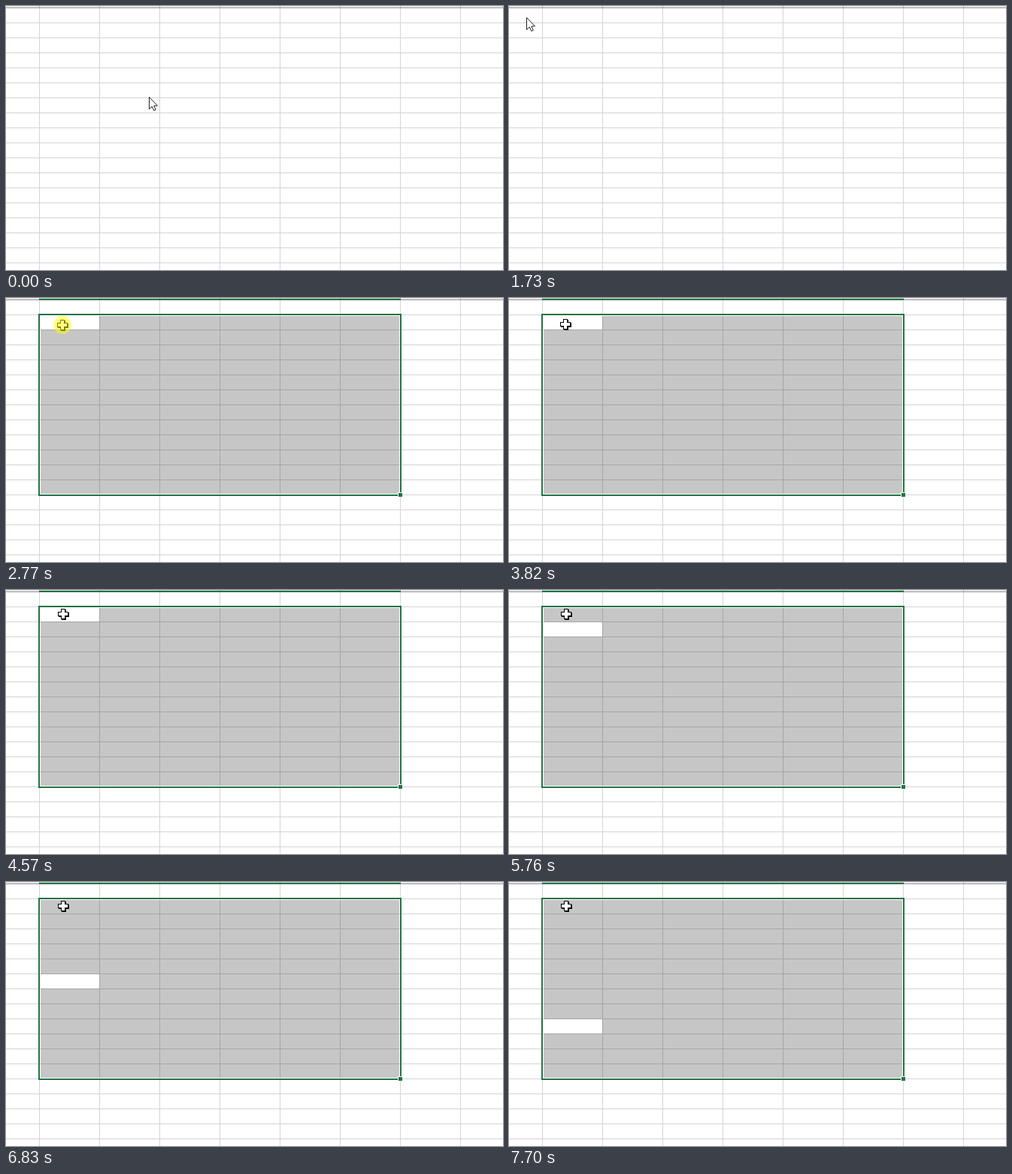
These frames come from a looping animation (661x352 px, 8000 ms). An HTML page with a canvas:

```html
<!DOCTYPE html>
<html lang="en">
<head>
<meta charset="utf-8">
<title>Moving through a selected range</title>
<style>
  html, body { margin: 0; width: 100%; height: 100%; overflow: hidden; background: #fff; }
  canvas { display: block; }
</style>
</head>
<body>
<canvas id="stage" width="661" height="352"></canvas>
<script>
const ctx = document.getElementById('stage').getContext('2d');
const WIDTH = 661, HEIGHT = 352, LOOP = 8000;
const COL = 80, ROW = 20, LEFT = 44, TOP = 22, RIGHT = 524, BOTTOM = 262;
const GREEN = '#217346';

// Pointer stops between 1670 and 2430 ms, evenly spaced in time
const travel = [[23, 15], [21, 14], [20, 15], [22, 19], [29, 27], [42, 36],
                [55, 43], [65, 47], [70, 48], [73, 45], [75, 40], [75, 37]];
const arrowStops = [
  [0, 190, 121], [70, 25, 16],
  ...travel.map(([x, y], i) => [1670 + i * 760 / 11, x, y]),
  [2500, 75, 36]
];
const crossStops = [[2770, 68, 29], [3820, 68, 28], [4150, 68, 26], [4500, 68, 25], [4570, 69, 25]];
const rowTimes = [5760, 6110, 6370, 6570, 6830, 7100, 7300, 7700];
const SELECT_AT = 2770;

const latest = (stops, t) => stops.filter(s => s[0] <= t + 0.5).pop();

function rect(color, x, y, w, h) {
  ctx.fillStyle = color;
  ctx.fillRect(x, y, w, h);
}

function gridLines(color, x0, y0, x1, y1) {
  for (let x = LEFT; x < x1; x += COL) if (x >= x0) rect(color, x, y0, 1, y1 - y0);
  for (let y = TOP; y < y1; y += ROW) if (y >= y0) rect(color, x0, y, x1 - x0, 1);
}

function drawSheet() {
  rect('#fff', 0, 0, WIDTH, HEIGHT);
  gridLines('#d4d4d4', 0, 3, WIDTH, HEIGHT);
  rect('#e6e6e6', 0, 0, WIDTH, 2);
  for (let x = LEFT; x < WIDTH; x += COL) rect('#ababab', x, 0, 1, 2);
  rect('#999', 0, 2, WIDTH, 1);
}

function drawSelection(activeRow) {
  rect('#d2d2d2', LEFT, 0, RIGHT - LEFT + 1, 1);
  for (let x = LEFT; x <= RIGHT; x += COL) rect('#ababab', x, 0, 1, 1);
  rect(GREEN, LEFT, 1, RIGHT - LEFT + 1, 2);

  rect(GREEN, LEFT - 1, TOP - 1, RIGHT - LEFT + 3, BOTTOM - TOP + 3);
  rect('#fff', LEFT + 1, TOP + 1, RIGHT - LEFT - 1, BOTTOM - TOP - 1);
  rect('#c6c6c6', LEFT + 2, TOP + 2, RIGHT - LEFT - 3, BOTTOM - TOP - 3);
  gridLines('#a6a6a6', LEFT + 2, TOP + 2, RIGHT - 1, BOTTOM - 1);

  const y = TOP + activeRow * ROW + (activeRow ? 1 : 2);
  rect('#fff', LEFT + 2, y, COL - 2, TOP + (activeRow + 1) * ROW - y);

  rect('#fff', RIGHT - 3, BOTTOM - 3, 6, 6);
  rect(GREEN, RIGHT - 2, BOTTOM - 2, 5, 5);
}

const arrow = new Path2D('M.5.5V16.5L4.2 13L6.8 18.5L9.2 17.4L6.8 12H11.5Z');

function drawArrow(x, y) {
  ctx.save();
  ctx.translate(x, y);
  ctx.fillStyle = '#fff';
  ctx.fill(arrow);
  ctx.strokeStyle = '#222';
  ctx.lineWidth = 1;
  ctx.stroke(arrow);
  ctx.restore();
}

function plus(color, x, y, size, arm) {
  const inset = (size - arm) / 2;
  rect(color, x + inset, y, arm, size);
  rect(color, x, y + inset, size, arm);
}

function drawCross(x, y) {
  plus('#000', x + 1, y + 1, 14, 6);
  plus('#000', x, y, 14, 6);
  plus('#fff', x + 1, y + 1, 12, 4);
}

function drawHighlight() {
  ctx.fillStyle = 'rgba(255, 255, 0, .5)';
  ctx.beginPath();
  ctx.arc(75, 36, 12, 0, Math.PI * 2);
  ctx.fill();
}

function draw(t) {
  drawSheet();
  if (t < SELECT_AT) {
    const [, x, y] = latest(arrowStops, t);
    drawArrow(x, y);
  } else {
    drawSelection(rowTimes.filter(time => time <= t).length);
    const [, x, y] = latest(crossStops, t);
    drawCross(x, y);
  }
  if (t >= 2700 && t < 3490) drawHighlight();
}

const start = performance.now();
function tick() {
  draw((performance.now() - start) % LOOP);
  requestAnimationFrame(tick);
}
tick();
</script>
</body>
</html>
```
